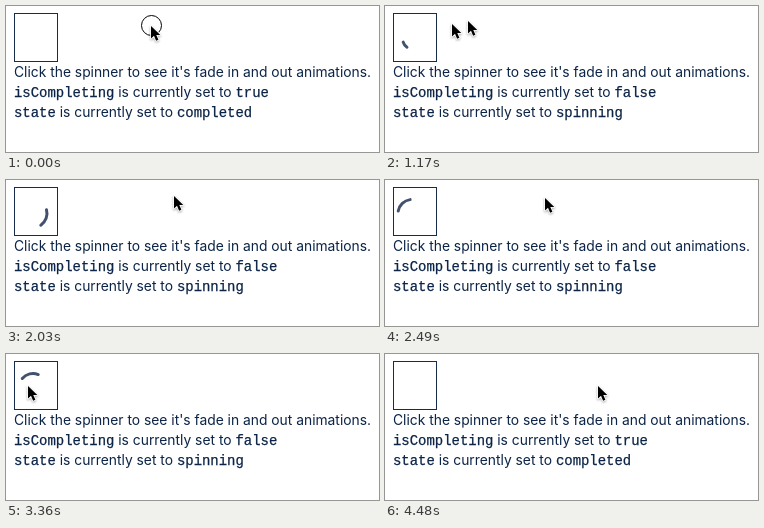
Animation, 373 px wide and 146 px high, one loop 4.69 s. Source, as an HTML page:

```html
<!DOCTYPE html>
<html lang="en">
<head>
<meta charset="utf-8">
<title>Spinner demo</title>
<style>
  html, body { margin: 0; width: 100%; height: 100%; overflow: hidden; background: #fff; }
  svg { display: block; }
  text { font: 13.84px Inter, sans-serif; fill: #0b2447; white-space: pre; }
  .code { font: 13.95px Courier, "Liberation Mono", monospace; stroke: #0b2447; stroke-width: .25; }
</style>
</head>
<body>
<svg width="373" height="146" viewBox="0 0 373 146">
  <defs>
    <path id="arrow" d="M1 1V13.6L4 10.8L6.1 15.8L8.4 14.8L6.3 10H10.3Z"
      stroke="#fff" stroke-width="1.6" stroke-linejoin="round" paint-order="stroke"
      style="filter: drop-shadow(0 1px .8px #0005)"/>
  </defs>
  <rect x="8.5" y="7.5" width="43" height="48" fill="none" stroke="#172b4d"/>
  <path id="arc" fill="none" stroke="#42526e" stroke-width="3" stroke-linecap="round"/>
  <text x="8" y="71">Click the spinner to see it's fade in and out animations.</text>
  <text x="8" y="91"><tspan class="code">isCompleting</tspan> is currently set to <tspan class="code" id="completing"></tspan></text>
  <text x="8" y="111"><tspan class="code">state</tspan> is currently set to <tspan class="code" id="state"></tspan></text>
  <circle id="ring" r="10" fill="none" stroke="#000"/>
  <use id="ghost" href="#arrow"/>
  <use id="cursor" href="#arrow"/>
</svg>
<script>
const LOOP = 4690;
const CLICK_IN = 930, CLICK_OUT = 3500, DONE = 4130;

const home = { x: 144, y: 19 };
// each move eases to (x, y); lift bows its path upwards
const moves = [
  { from: 330, to: 830, x: 24, y: 28, lift: 0 },
  { from: 950, to: 1460, x: 168, y: 15, lift: 9 },
  { from: 1950, to: 2460, x: 159, y: 17, lift: 0 },
  { from: 2760, to: 3260, x: 21, y: 31, lift: 0 },
  { from: 3540, to: 3900, x: 163, y: 16, lift: 3 },
  { from: 3980, to: 4280, x: 212, y: 31, lift: -10 }
];

const $ = id => document.getElementById(id);
const within = (t, from, to) => t >= from && t < to;
const show = (id, on) => $(id).setAttribute("visibility", on ? "visible" : "hidden");

function set(id, attrs) {
  for (const name in attrs) $(id).setAttribute(name, attrs[name]);
}

function ease(t, from, to) {
  const k = Math.max(0, Math.min(1, (t - from) / (to - from)));
  return k * k * (3 - 2 * k);
}

function mouseAt(t) {
  let { x, y } = home;
  for (const move of moves) {
    const k = ease(t, move.from, move.to);
    x += (move.x - x) * k;
    y += (move.y - y) * k - move.lift * Math.sin(Math.PI * k);
  }
  return { x: Math.round(x), y: Math.round(y) };
}

function drawSpinner(t) {
  const enter = ease(t, CLICK_IN + 10, 1560);
  const leave = ease(t, CLICK_OUT, 4090);
  const size = Math.sqrt(enter * (1 - leave));
  const angle = 205 + 0.448 * (t - 1640) - 308 * (1 - enter) + 270 * leave;
  const sweep = 72 * size;
  const r = 7 + 7 * enter + 1.5 * leave;
  const point = deg => {
    const rad = deg * Math.PI / 180;
    return `${27 + r * Math.cos(rad)} ${33.5 + r * Math.sin(rad)}`;
  };
  show("arc", size > 0);
  set("arc", {
    d: `M${point(angle - sweep / 2)}A${r} ${r} 0 0 1 ${point(angle + sweep / 2)}`,
    opacity: Math.min(1, 2 * size)
  });
}

function drawMouse(t) {
  const { x, y } = mouseAt(t);
  set("cursor", { x, y });
  set("ghost", mouseAt(t - 40));
  set("ring", { cx: x + 1.5, cy: y + 0.5 });
  show("ring", t < 30 || within(t, CLICK_IN - 40, CLICK_IN + 20) || within(t, CLICK_OUT - 60, CLICK_OUT));
  show("ghost", within(t, 1170, 1200));
}

function drawText(t) {
  const active = within(t, CLICK_IN, CLICK_OUT);
  $("completing").textContent = !active;
  $("state").textContent = active ? "spinning" : within(t, CLICK_OUT, DONE) ? "removing" : "completed";
}

const start = performance.now();
function frame() {
  const t = (performance.now() - start) % LOOP;
  drawSpinner(t);
  drawMouse(t);
  drawText(t);
  requestAnimationFrame(frame);
}
frame();
</script>
</body>
</html>
```
